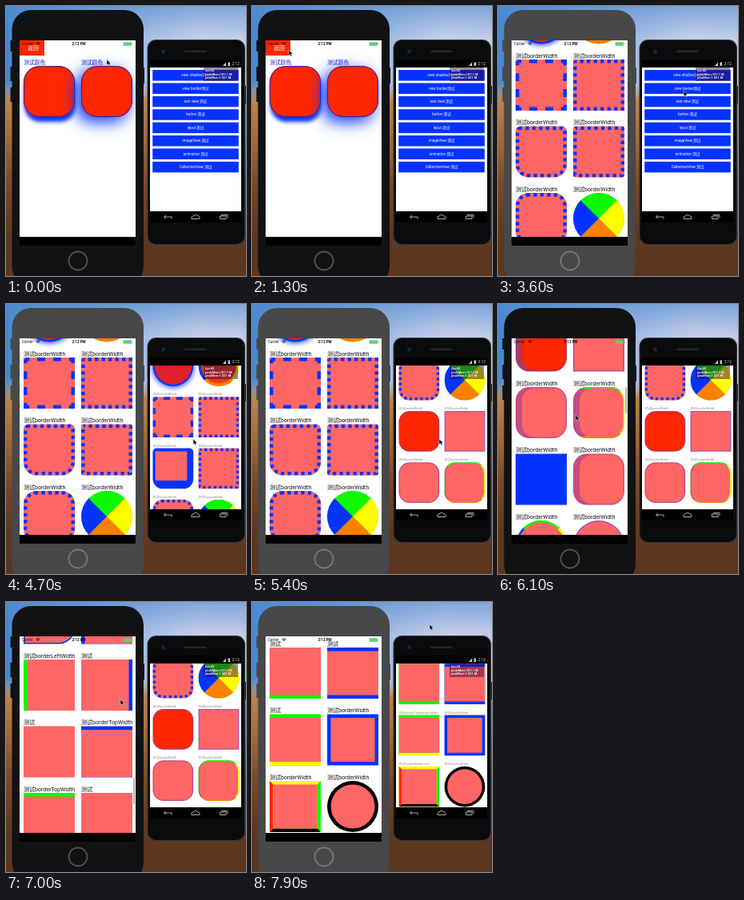
Recreate the animation shown at these times as an HTML page with a canvas. Size 300 by 338 pixels, loop 8000 ms.

```html
<!DOCTYPE html>
<html lang="zh">
<head>
<meta charset="utf-8">
<style>
  html, body { margin: 0; width: 100%; height: 100%; overflow: hidden; }
  canvas { display: block; width: 300px; height: 338px; }
</style>
</head>
<body>
<canvas id="stage"></canvas>
<script>
const W = 300, H = 338, LOOP = 8000, STEP = 100;
const canvas = document.getElementById('stage');
const c = canvas.getContext('2d');
const dpr = window.devicePixelRatio || 1;
canvas.width = W * dpr;
canvas.height = H * dpr;

const FONT = 'Roboto, "Noto Sans CJK SC", "Noto Sans CJK", sans-serif';
const RED = '#ff2600', PINK = '#ff6666', BLUE = '#0433ff', GREEN = '#10f800';
const YELLOW = '#fffb00', ORANGE = '#ff8000', PURPLE = '#c44c80', VIOLET = '#9a4cb4';

// ---- motion ----
const CURSOR = [[0, 126, 67], [700, 46, 55], [2450, 46, 55], [2700, 60, 88], [3300, 90, 120],
  [3600, 232, 106], [4000, 232, 106], [4300, 234, 169], [5400, 234, 169], [5800, 97, 139],
  [6300, 97, 139], [6700, 143, 122], [7100, 143, 122], [7300, 236, 160], [7700, 236, 160], [7900, 222, 28]];
const LEFT_SCROLL = [[3000, 0], [3400, 159], [5700, 159], [6100, 456], [6400, 620], [7000, 1323], [7200, 1588.5]];
const RIGHT_SCROLL = [[4200, 0], [4700, 101], [4900, 101], [5400, 276], [7300, 276], [7700, 1232]];
const LEFT_BACK = [[1400, 0], [1900, 1]];
const LEFT_PUSH = [[2700, 0], [3000, 1]];
const RIGHT_PUSH = [[3900, 0], [4200, 1]];

// Eased value of column `col` in a list of [time, value...] keys.
function at(keys, t, col = 1) {
  if (t <= keys[0][0]) return keys[0][col];
  for (let i = 1; i < keys.length; i++) {
    const [a, b] = [keys[i - 1], keys[i]];
    if (t <= b[0]) {
      const p = (t - a[0]) / (b[0] - a[0]);
      return a[col] + (b[col] - a[col]) * p * p * (3 - 2 * p);
    }
  }
  return keys[keys.length - 1][col];
}

// ---- drawing helpers ----
function rect(x, y, w, h, fill) { c.fillStyle = fill; c.fillRect(x, y, w, h); }

function round(x, y, w, h, r, fill) {
  c.beginPath();
  c.roundRect(x, y, w, h, r);
  if (fill) { c.fillStyle = fill; c.fill(); }
}

function poly(points, fill) {
  c.beginPath();
  points.forEach(([x, y]) => c.lineTo(x, y));
  c.closePath();
  c.fillStyle = fill;
  c.fill();
}

function text(s, x, y, size, fill, align = 'left', weight = 400) {
  c.font = `${weight} ${size}px ${FONT}`;
  c.fillStyle = fill;
  c.textAlign = align;
  c.textBaseline = 'middle';
  c.fillText(s, x, y);
}

function clipped(x, y, w, h, draw) {
  c.save();
  c.beginPath();
  c.rect(x, y, w, h);
  c.clip();
  c.translate(x, y);
  draw();
  c.restore();
}

function gradient(x1, y1, stops) {
  const g = c.createLinearGradient(0, 0, x1, y1);
  stops.forEach(([p, color]) => g.addColorStop(p, color));
  return g;
}

// ---- bordered boxes; sides run top, right, bottom, left ----
const SIZE = 64, B = 4.5;
const label = (suffix, box) => ({ ...box, label: '测试' + suffix });
const solid = (width, colors, radius = 0, fill = PINK) =>
  ({ width: [].concat(width), colors: [].concat(colors), radius, fill });
// Dashes divide each side evenly and are centred on the corners.
const dashed = (perSide, radius) => ({ dash: (SIZE - B) / perSide / 2, radius, fill: PINK });
const side = (n, color) => solid([0, 1, 2, 3].map(i => i === n ? B : 0), color);
const bw = box => label('borderWidth', box);
// A wide left edge on one phone, an even thin outline on the other.
const wideLeft = (colors, fill) =>
  ({ ...solid([1.3, 1.3, 1.3, 8], colors, 17, fill), android: solid(1.6, colors, 17, fill) });

const RAINBOW = [GREEN, YELLOW, ORANGE, BLUE];
const ROWS = [
  [solid(B, BLUE), solid(B, BLUE, 16)].map(bw),
  [{ ...solid(2.5, BLUE, 32, '#e0202a'), glow: 7 }, solid(B, RAINBOW, 32, '#ee3a20')].map(bw),
  [dashed(3, 0), dashed(7, 0)].map(bw),
  [{ ...dashed(7, [6, 6, 16, 16]), android: { ...solid([5, 10, 13, 4], BLUE, [6, 6, 16, 16]), innerRadius: 0 } },
    dashed(7, 3)].map(bw),
  [dashed(7, 16), solid(32, RAINBOW, 32)].map(bw),
  [wideLeft('#a83a68', RED), solid(1.3, VIOLET)].map(bw),
  [wideLeft(PURPLE), wideLeft([GREEN, YELLOW, ORANGE, PURPLE])].map(bw),
  [solid(32, BLUE), wideLeft(PURPLE)].map(bw),
  [solid(2.5, RAINBOW, 32), solid(1.3, VIOLET, 32)].map(bw),
  [solid(B, BLUE, 16), solid(B, RAINBOW, 16)].map(bw),
  [solid(B, GREEN, 8), solid(B, BLUE, 32)].map(bw),
  [solid(2, VIOLET, 16), solid(B, RAINBOW)].map(bw),
  [solid(B, BLUE, [16, 0, 0, 0]), solid(B, GREEN, [0, 16, 0, 0])].map(bw),
  [solid(B, BLUE, [0, 0, 16, 0]), solid(B, GREEN, [0, 0, 0, 16])].map(bw),
  [solid(2, VIOLET, [16, 16, 0, 0]), solid(2, BLUE, 8)].map(bw),
  [bw(solid(1.5, BLUE, [0, 0, 20, 0])), label('borderLeftWidth', side(3, BLUE))],
  [label('borderLeftWidth', side(3, GREEN)), label('', side(1, BLUE))],
  [label('', side(1, PINK)), label('borderTopWidth', side(0, BLUE))],
  [label('borderTopWidth', side(0, GREEN)), label('', side(2, BLUE))],
  [label('', side(2, GREEN)), label('', solid([B, 0, B, 0], BLUE))],
  [{ ...label('', solid([B, 0, B, 0], [GREEN, GREEN, YELLOW, GREEN])), longLabel: '测试borderTopBottomWidth' },
    bw(solid(B, BLUE))],
  [{ ...bw(solid(B, [YELLOW, GREEN, '#000', RED])), longLabel: '测试borderWidth color' }, bw(solid(B, '#000', 32))]
];

function drawBox({ radius, fill, dash, glow, width, colors = [], innerRadius }) {
  const inset = d => [].concat(radius).map(r => Math.max(0, r - d));
  c.save();
  if (glow) { c.shadowColor = BLUE; c.shadowBlur = glow * dpr; c.shadowOffsetY = dpr; }
  round(0, 0, SIZE, SIZE, radius, dash ? fill : colors[0]);
  c.shadowColor = 'transparent';
  c.clip();
  if (dash) {
    c.strokeStyle = BLUE;
    c.lineWidth = B;
    c.setLineDash([dash, dash]);
    c.lineDashOffset = dash / 2;
    round(B / 2, B / 2, SIZE - B, SIZE - B, inset(B / 2));
    c.stroke();
  } else {
    const [t, r = t, b = t, l = r] = width;
    if (colors.length > 1) {
      // Extend the mitres inward so they also split rounded corners.
      const k = radius ? 32 / Math.max(t, r, b, l) : 1;
      const outer = [[0, 0], [SIZE, 0], [SIZE, SIZE], [0, SIZE]];
      const inner = [[l * k, t * k], [SIZE - r * k, t * k], [SIZE - r * k, SIZE - b * k], [l * k, SIZE - b * k]];
      colors.forEach((color, i) => {
        const j = (i + 1) % 4;
        poly([outer[i], outer[j], inner[j], inner[i]], color);
      });
    }
    if (l + r < SIZE) round(l, t, SIZE - l - r, SIZE - t - b, innerRadius ?? inset(t), fill);
  }
  c.restore();
}

// ---- pages, in the units of the left screen ----
function borderPage(scroll, android) {
  const pitch = android ? 81 : 83.5;
  const top = android ? 15 : 16;
  rect(0, 0, 145, 260, '#fff');
  ROWS.forEach((row, i) => {
    const y = top + i * pitch - scroll;
    if (y < -85 || y > 265) return;
    row.forEach((box, col) => {
      c.save();
      c.translate(5 + col * 72, y);
      drawBox(android && box.android || box);
      if (android) text(box.longLabel || box.label, 0, -4, 5, '#888');
      else text(box.label, 0, -4.3, 7, '#111');
      c.restore();
    });
  });
}

function shadowPage() {
  rect(0, 0, 145, 260, '#fff');
  const tile = (x, dx, blur) => {
    c.save();
    c.shadowColor = BLUE;
    c.shadowBlur = blur * dpr;
    c.shadowOffsetX = dx * dpr;
    c.shadowOffsetY = 6 * dpr;
    round(x, 32, SIZE, SIZE, 20, RED);
    c.restore();
    c.strokeStyle = '#2a1fb0';
    c.lineWidth = 1;
    round(x + .5, 32.5, SIZE - 1, SIZE - 1, 20);
    c.stroke();
  };
  tile(5, 1, 5);
  tile(77, -6, 20);
  text('测试颜色', 5, 28, 6.8, '#1420c8');
  text('测试颜色', 77, 28, 6.8, '#1420c8');
  rect(0, 0, 31, 19, RED);
  text('返回', 17, 10, 7, '#fff', 'center');
}

const ITEMS = ['view shadow测试', 'view border测试', 'text view 测试', 'button 测试',
  'input 测试', 'imageView 测试', 'animation 测试', 'CollectionView 测试'];

function listPage(w, top, pitch, h, size, margin) {
  rect(0, 0, w, 260, '#fff');
  ITEMS.forEach((item, i) => {
    const y = top + i * pitch;
    rect(margin, y - h / 2, w - 2 * margin, h, BLUE);
    text(item, w / 2, y, size, '#fff', 'center');
  });
}

function shifted(x, draw) {
  c.save();
  c.translate(x, 0);
  draw();
  c.restore();
}

// ---- scene ----
function wallpaper() {
  rect(0, 0, W, H, gradient(W, 0, [[0, '#4a88cc'], [.3, '#6f9fd8'], [.6, '#a9bfe4'], [.8, '#c6cde8'], [1, '#c2cbe8']]));
  rect(0, 0, W, 40, gradient(0, 40, [[0, 'rgba(80,140,210,.6)'], [1, 'rgba(80,140,210,0)']]));
  rect(0, 95, W, H, gradient(0, H, [[.28, 'rgba(190,170,160,0)'], [.35, '#b98552'], [.5, '#a06a3c'],
    [.65, '#7a4a2a'], [.85, '#5e3820'], [1, '#5c361f']]));
}

function leftStatus() {
  text('Carrier', 20, 47.5, 4.5, '#111');
  c.strokeStyle = '#111';
  c.lineWidth = .8;
  [1, 2.3, 3.6].forEach(r => {
    c.beginPath();
    c.arc(40, 49.3, r, -Math.PI * .75, -Math.PI * .25);
    c.stroke();
  });
  text('2:12 PM', 91, 47.5, 4.5, '#111', 'center', 700);
  round(146.5, 45.3, 10.5, 4.5, 1, '#62cf76');
  rect(157.5, 46.6, 1, 2, '#62cf76');
}

function leftPhone(t) {
  const idle = (t >= 3400 && t < 5600) || t >= 7250;
  const body = idle ? '#484848' : '#111213';
  [[43, 14], [76, 18], [102, 18]].forEach(([y, h]) => rect(5.5, y, 3, h, body));
  rect(171, 77, 2, 20, body);
  round(7.5, 5, 164.5, 345, 24, body);
  c.strokeStyle = idle ? '#777' : '#505256';
  c.lineWidth = 1.8;
  c.beginPath();
  c.arc(90, 319, 11.5, 0, Math.PI * 2);
  c.stroke();

  const back = at(LEFT_BACK, t), push = at(LEFT_PUSH, t), scroll = at(LEFT_SCROLL, t);
  clipped(17, 43, 145, 257, () => {
    shifted(-48 * (1 - back + push), () => listPage(145, 22, 23.05, 19, 7, 5));
    const detail = (x, page) => shifted(x, () => {
      rect(0, 0, 145, 257, '#000');
      clipped(0, 0, 145, 246, page);
    });
    if (back < 1) detail(145 * back, shadowPage);
    if (push > 0) detail(145 * (1 - push), () => borderPage(scroll, false));
    if (t >= 5700 && t < 7300) round(142.3, scroll / 1837 * 246, 1.5, 33, .7, 'rgba(0,0,0,.4)');
  });
  leftStatus();
}

function rightPhone(t) {
  rect(298, 100, 2, 22, '#222');
  round(176.5, 42, 122.5, 257, 11, '#34363a');
  round(177.5, 43, 120.5, 255, 10, '#0a0b0d');
  round(223, 55.5, 28, 2.5, 1.2, '#25272a');
  round(194, 54.5, 5, 5, 2.5, '#1b2430');
  rect(180, 67, 114, 204, '#000');
  text('2:12', 292, 72.8, 4.8, '#ddd', 'right');
  poly([[271, 75], [275, 75], [275, 70.5]], '#ccc');
  rect(277.5, 70.5, 2.5, 4.5, '#ccc');

  const push = at(RIGHT_PUSH, t);
  clipped(180, 77, 114, 180, () => {
    listPage(114, 9.8, 16.4, 13.5, 4.6, 3.2);
    if (push > 0) {
      c.save();
      c.translate(114 * (1 - push) - .5, 0);
      c.scale(.793, .793);
      borderPage(at(RIGHT_SCROLL, t) / .793, true);
      c.restore();
    }
    rect(67, 0, 43, 17, 'rgba(50,10,60,.48)');
    ['fps:60', 'peakMem:107.1 M', 'javaMem:1.021 M'].forEach((s, i) =>
      text(s, 69, 4 + i * 4.6, 4, '#fff', 'left', 500));
  });

  c.strokeStyle = '#aaa';
  c.lineWidth = 1;
  c.beginPath();
  c.moveTo(200, 261.8); c.lineTo(197.5, 264); c.lineTo(200, 266);
  c.moveTo(197.5, 264); c.lineTo(207, 264); c.lineTo(207, 266.5);
  c.moveTo(232, 264); c.lineTo(237, 261); c.lineTo(242, 264);
  c.lineTo(242, 266.5); c.lineTo(232, 266.5); c.closePath();
  c.rect(267.5, 263, 7.5, 3.5);
  c.moveTo(269, 261.5); c.lineTo(277, 261.5); c.lineTo(277, 265);
  c.stroke();
}

function pointer(x, y) {
  c.save();
  c.translate(x, y);
  poly([[0, 0], [0, 7], [1.6, 5.6], [2.8, 8.2], [4, 7.6], [2.9, 5.2], [5, 5]], '#000');
  c.strokeStyle = '#fff';
  c.lineWidth = .5;
  c.stroke();
  c.restore();
}

function frame(now) {
  const t = Math.floor(now % LOOP / STEP) * STEP;
  c.setTransform(dpr, 0, 0, dpr, 0, 0);
  wallpaper();
  leftPhone(t);
  rightPhone(t);
  pointer(at(CURSOR, t), at(CURSOR, t, 2));
  requestAnimationFrame(frame);
}
frame(0);
</script>
</body>
</html>
```
